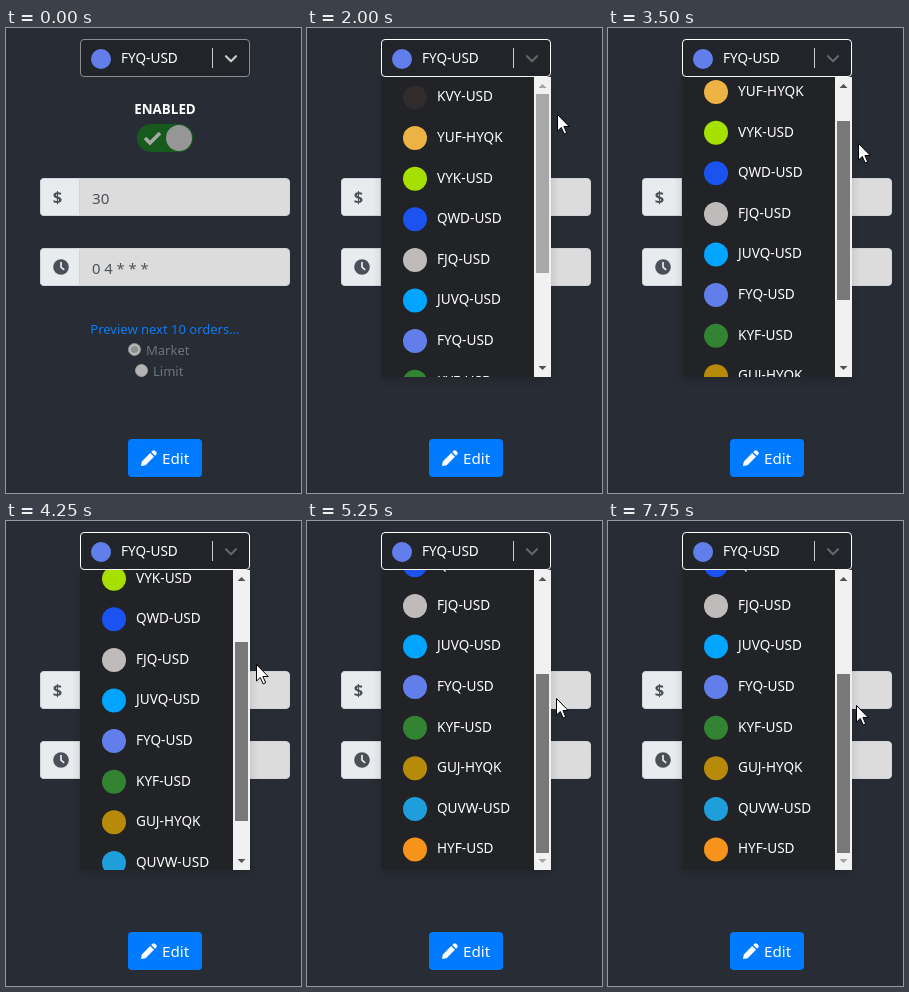
Animation of 295 by 465 pixels, one loop 8 s. Source, as an HTML page:

```html
<!DOCTYPE html>
<html lang="en">
<head>
<meta charset="utf-8">
<title>Currency pair selector</title>
<style>
  html, body { margin: 0; width: 100%; height: 100%; overflow: hidden; background: #282c34; }
  svg { display: block; width: 295px; height: 465px; }
  text { font: 13px "Noto Sans", "Open Sans", sans-serif; }
  .pair { font-size: 13.6px; fill: #fff; }
  .heading { font-size: 13.4px; font-weight: 700; fill: #fff; }
  .value { font-size: 15.2px; fill: #4d5257; }
  .muted { fill: #6c757d; }
  .panel { filter: drop-shadow(0 3px 5px rgba(0, 0, 0, .16)); }
</style>
</head>
<body>
<svg viewBox="0 0 295 465">
  <defs>
    <clipPath id="menuClip"><rect x="74" y="49" width="153" height="300"/></clipPath>
    <clipPath id="stage"><rect width="295" height="465"/></clipPath>
  </defs>
  <rect width="295" height="465" fill="#282c34"/>

  <!-- Switch -->
  <text class="heading" x="159" y="86" text-anchor="middle">ENABLED</text>
  <rect x="131" y="96" width="56" height="28" rx="14" fill="#185a1e"/>
  <path d="M139 110l5 5 10-10" fill="none" stroke="#a3a9a4" stroke-width="3.6"/>
  <circle cx="173" cy="110" r="13" fill="#969696"/>

  <!-- Inputs -->
  <g id="inputs"></g>
  <text x="51.5" y="175" text-anchor="middle" style="font-size:16.5px;font-weight:700" fill="#495057">$</text>
  <text class="value" x="86" y="175.5">30</text>
  <circle cx="55" cy="239" r="7.8" fill="#495057"/>
  <path d="M55 234v5.2l3.2 2.6" fill="none" stroke="#e9ecef" stroke-width="1.7"/>
  <text class="value" x="86" y="245.5" style="font-size:14.8px">0 4 * * *</text>

  <!-- Order type -->
  <text x="159" y="306" text-anchor="middle" fill="#0d7bf5">Preview next 10 orders...</text>
  <circle cx="128.5" cy="321.5" r="6" fill="#b9b9b9" stroke="#8f8f8f"/>
  <circle cx="128.5" cy="321.5" r="3.6" fill="#8f8f8f"/>
  <text class="muted" x="140" y="327">Market</text>
  <circle cx="135.5" cy="342.5" r="6" fill="#b4b4b4" stroke="#a0a0a0"/>
  <text class="muted" x="147" y="348">Limit</text>

  <!-- Edit button -->
  <rect x="122" y="411" width="74" height="38" rx="4" fill="#007bff"/>
  <path d="M135 438l.8-4.6 8.4-8.4 3.8 3.8-8.4 8.4zM145.2 424l1.3-1.3q1.2-1 2.4 0l1.4 1.4q1 1.2 0 2.4l-1.3 1.3z" fill="#fff"/>
  <text x="156" y="436" fill="#fff" style="font-size:15.2px">Edit</text>

  <!-- Select control -->
  <rect id="control" x="74.5" y="11.5" width="169" height="37" rx="3.5" fill="#212529"/>
  <circle cx="95" cy="31" r="10" fill="#627eea"/>
  <text class="pair" x="115" y="35">FYQ-USD</text>
  <path d="M206.5 20v20" stroke="#ccc"/>
  <path id="chevron" d="M220 28.2l5 5 5-5" fill="none" stroke-width="2.2" stroke-linecap="round" stroke-linejoin="round"/>

  <!-- Menu -->
  <g id="menu">
    <rect class="panel" x="74" y="49" width="170" height="300" fill="#212327"/>
    <g clip-path="url(#menuClip)"><g id="options"></g></g>
    <rect x="227" y="49" width="17" height="300" fill="#f1f1f1"/>
    <path id="arrowUp" d="M231.5 60h8l-4-4z"/>
    <path id="arrowDown" d="M231.5 338h8l-4 4z"/>
    <rect id="thumb" x="229" width="13" height="179"/>
  </g>

  <g clip-path="url(#stage)">
    <path id="cursor" d="M0 0v16.6l3.8-3.6 2.8 6.4 2.6-1.1-2.8-6.3h5.3z" fill="#fff" stroke="#000" stroke-linejoin="round"/>
  </g>
</svg>
<script>
const LOOP = 8000, STEP = 250;
const OPEN_AT = 1000, HOVER_AT = 1750, DRAG_AT = 2500;
const DRAG_Y = 88, THUMB_TOP = 66, THUMB_TRAVEL = 87, SCROLL_MAX = 147;
const ROW = 40.6;

const pairs = [
  ['KVY-USD', '#302c2c'], ['YUF-HYQK', '#ecb244'], ['VYK-USD', '#a6e000'],
  ['QWD-USD', '#1a53f0'], ['FJQ-USD', '#bfbbbb'], ['JUVQ-USD', '#01a5ff'],
  ['FYQ-USD', '#627eea'], ['KYF-USD', '#328332'], ['GUJ-HYQK', '#b88a0a'],
  ['QUVW-USD', '#1e9fdc'], ['HYF-USD', '#f7931a']
];

// Pointer path: time, x, y
const path = [
  [250, 246, 2], [750, 226, 24], [1250, 221, 27], [1500, 234, 48],
  [2000, 250, 86], [2500, 250, 88], [3500, 250, 115], [4250, 250, 143],
  [4750, 250, 164], [6000, 248, 197], [7250, 248, 197], [7750, 248, 184]
];

const $ = id => document.getElementById(id);
const set = (id, attrs) => {
  for (const name in attrs) $(id).setAttribute(name, attrs[name]);
};

$('inputs').innerHTML = [150, 220].map(y => `
  <rect x="34.5" y="${y + .5}" width="249" height="37" rx="3.5" fill="#dcdcdc" stroke="#ced4da"/>
  <path d="M73.5 ${y + .5}H38a3.5 3.5 0 0 0-3.5 3.5v30a3.5 3.5 0 0 0 3.5 3.5h35.5z" fill="#e9ecef" stroke="#ced4da"/>`).join('');

$('options').innerHTML = pairs.map(([name, color], i) => `
  <circle cx="108" cy="${69.5 + i * ROW}" r="12" fill="${color}"/>
  <text class="pair" x="130" y="${73.3 + i * ROW}">${name}</text>`).join('');

function pointerAt(t) {
  const next = path.findIndex(key => key[0] >= t);
  if (next < 1) return path[0].slice(1);
  const [t0, x0, y0] = path[next - 1], [t1, x1, y1] = path[next];
  const k = (t - t0) / (t1 - t0);
  return [x0 + (x1 - x0) * k, y0 + (y1 - y0) * k];
}

function draw(time) {
  const t = Math.floor((time % LOOP) / STEP) * STEP;
  const [x, y] = pointerAt(t).map(Math.round);
  const open = t >= OPEN_AT;
  const drag = t < DRAG_AT ? 0 : t >= 6000 ? THUMB_TRAVEL
    : Math.max(0, Math.min(THUMB_TRAVEL, y - DRAG_Y));
  const scroll = Math.round(drag * SCROLL_MAX / THUMB_TRAVEL);
  const arrowColor = atEnd => atEnd ? '#a3a3a3' : '#505050';

  set('cursor', { transform: `translate(${x + .5} ${y + .5})`, visibility: t ? 'visible' : 'hidden' });
  set('menu', { visibility: open ? 'visible' : 'hidden' });
  set('control', { stroke: open ? '#fff' : '#8b8d90' });
  set('chevron', { stroke: open ? '#666' : '#ccc' });
  set('options', { transform: `translate(0 ${-scroll})` });
  set('thumb', {
    y: THUMB_TOP + drag,
    fill: t >= DRAG_AT ? '#787878' : t >= HOVER_AT ? '#a8a8a8' : '#c1c1c1'
  });
  set('arrowUp', { fill: arrowColor(drag === 0) });
  set('arrowDown', { fill: arrowColor(drag === THUMB_TRAVEL) });
}

const start = performance.now();
function tick() {
  draw(performance.now() - start);
  requestAnimationFrame(tick);
}
tick();
</script>
</body>
</html>
```
